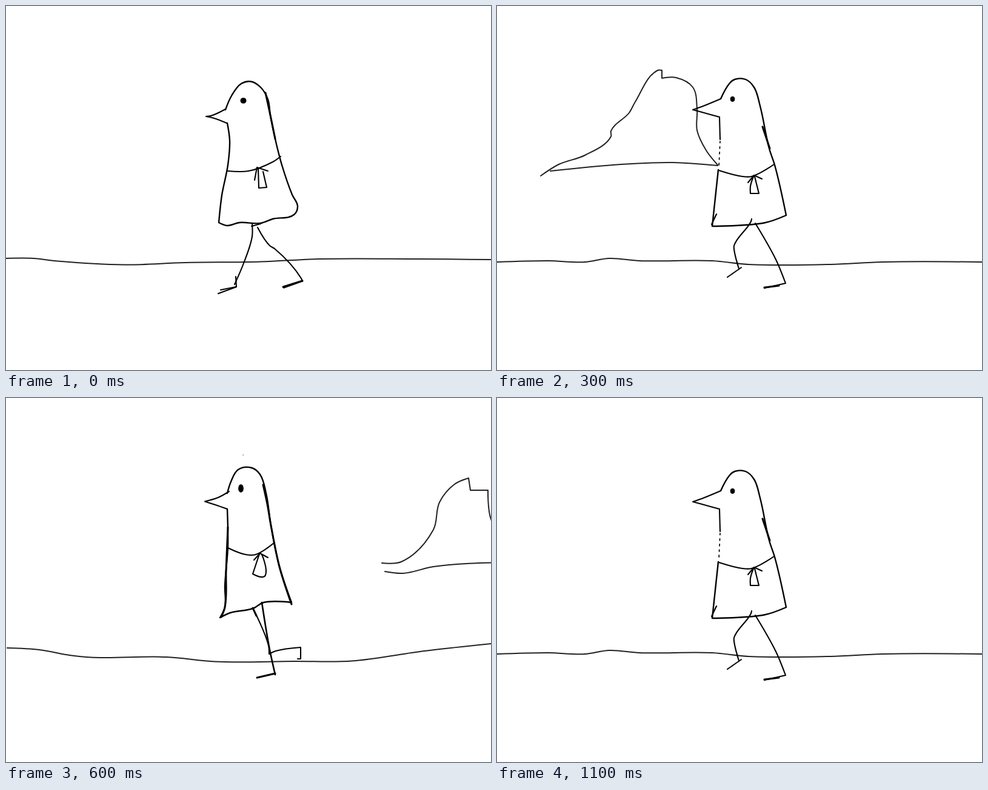
Animation of 800 by 600 pixels, one loop 1200 ms. Source, as an HTML page:

```html
<!DOCTYPE html>
<html lang="en">
<head>
<meta charset="utf-8">
<title>Walking bird</title>
<style>
  html, body { margin: 0; width: 100%; height: 100%; overflow: hidden; background: #fff; }
  svg { display: block; width: 800px; height: 600px; }
  g[hidden] { display: none; }
  path { fill: none; stroke: #000; stroke-linecap: round; stroke-linejoin: round; }
  .body { fill: #fff; }
  .scene { stroke: #222; }
  .dots { stroke-dasharray: 3 6; }
</style>
</head>
<body>
<svg id="stage" viewBox="0 0 800 600"></svg>
<script>
const STEP = 100, COUNT = 12;
const stage = document.getElementById('stage');
let layer;

function add(parent, tag, attrs) {
  const el = document.createElementNS('http://www.w3.org/2000/svg', tag);
  for (const key in attrs) el.setAttribute(key, attrs[key]);
  return parent.appendChild(el);
}

function unit(a, b) {
  const d = Math.hypot(b[0] - a[0], b[1] - a[1]) || 1;
  return [(b[0] - a[0]) / d, (b[1] - a[1]) / d];
}

// Direction at a point; zero at sharp turns, so corners stay corners.
function tangent(pts, i) {
  if (i === 0 || i === pts.length - 1) return [0, 0];
  const u = unit(pts[i - 1], pts[i]), v = unit(pts[i], pts[i + 1]);
  if (u[0] * v[0] + u[1] * v[1] < 0.4) return [0, 0];
  return unit([0, 0], [u[0] + v[0], u[1] + v[1]]);
}

function curve(text) {
  const pts = text.split(' ').map(p => p.split(',').map(Number));
  let d = 'M' + pts[0];
  for (let i = 1; i < pts.length; i++) {
    const a = pts[i - 1], b = pts[i];
    const reach = Math.hypot(b[0] - a[0], b[1] - a[1]) / 3;
    const s = tangent(pts, i - 1), e = tangent(pts, i);
    d += `C${a[0] + s[0] * reach},${a[1] + s[1] * reach} ` +
         `${b[0] - e[0] * reach},${b[1] - e[1] * reach} ${b}`;
  }
  return d;
}

const pen = (text, width = 2.1, name = '') =>
  add(layer, 'path', { d: curve(text), 'stroke-width': width, class: name });
const bold = text => pen(text, 3);
const scene = text => pen(text, 2, 'scene');
const body = text => pen(text, 2.4, 'body');
const eye = (cx, cy, rx, ry) => add(layer, 'ellipse', { cx, cy, rx, ry });

function stride() {
  body('362,171 372,148 388,128 404,124.5 420,134 432,154 436,180 444,219 455,262 472,311 481,330 475,344 440,351 420,358 385,357 365,362 351,357 356,312 366,262 369,222 365,193');
  scene('0,416 45,416 85,420.5 195,426.5 295,423 420,421.5 515,417 680,417 800,418');
  bold('428,143 436,180 444,219');
  pen('362,170 338,181 330,182 343,185 364,193');
  eye(391.5, 156, 5, 4.8);
  pen('366,272 400,272 440,257 453,248');
  pen('410,287 414,266 432,272');
  pen('416,268 417,300 430,299 424,273');
  pen('406,359 406,380 392,424 377,459');
  pen('379,446 380,463 350,474');
  pen('354,468 379,463');
  pen('405,363 420,359');
  pen('415,365 435,395 443,400 487,449 489,454');
  bold('457,463 489,453 458,464');
}

function kick() {
  body('360,165 380,134 402,122 415,129 429,155 436,195 449,258 462,295 471,343 440,343 418,340 400,347 378,350 362,361 358,330 358,285 362,255 362,187');
  scene('2,414 50,415 100,421 180,429 265,430 405,426 490,434 655,424 780,421 800,417');
  bold('402,122 424,142 436,195');
  bold('362,225 360,275');
  pen('362,164 350,173 328,178 340,183 362,187');
  eye(391, 155.5, 4, 4.8);
  pen('363,259 375,263 425,260 442,246');
  pen('402,276 411,264 423,272');
  pen('409,267 408,298 420,299 425,285 417,267');
  pen('401,347 400,380 397,407');
  bold('399,350 400,358');
  bold('398,407 412,438');
  bold('411,430 415,453');
  bold('382,454 414,451');
  pen('418,339 445,367 475,392 495,402');
  bold('477,426 494,412');
}

function lift() {
  body('365,157 371,138 383,118 405,115 419,126 429,157 437,210 451,278 471,337 425,337 407,347 370,354 353,362 361,345 361,310 366,245 365,183');
  scene('2,412 55,415 105,424 140,427.5 265,427 345,434.5 475,434 570,433.5 690,417 800,405');
  bold('424,143 431,175 437,210 451,278 471,340');
  bold('366,213 363,285 361,345 355,361');
  pen('368,154 350,164 328,170.5 345,176 365,183');
  eye(387.5, 149, 4.4, 6.8);
  pen('366,247 395,258 412,258 443,238');
  pen('409,267 419,256 432,263');
  pen('418,257 407,290 424,295 428,292 422,258');
  pen('408,348 433,408 434,422 445,417 486,411 486,430 481,430');
  bold('407,346 413,359');
  pen('422,337 434,410 444,456', 2.6);
  bold('414,461 444,454');
  pen('391,94 391.5,94', 1);
}

function reach() {
  body('369,153 384,127 392,121 410,121 424,134 434,165 449,235 458,262 477,345 443,357 355,363 365,270');
  scene('0,422 85,420 145,422 185,416 235,420 355,420 415,426 550,426 635,422 800,422');
  bold('438,199 450,235');
  pen('367,183 368,220');
  pen('368,223 366,265', 1.7, 'dots');
  pen('354,360 362,343');
  pen('369,153 340,165 323,171 345,177 367,183');
  eye(388.5, 153.5, 3.8, 4.4);
  pen('366,271 405,281 420,281 457,261');
  pen('414,291 424,279 437,285');
  pen('423,281 418,297 418,309 432,309 425,281');
  pen('420,351 419,355 391,395 391,401 399,433');
  pen('403,431 380,447');
  pen('426,358 460,418 476,457 441,465');
  bold('441,464 465,461');
}

function nearCloud() {
  scene('0,219 40,198 70,169 74,152 88,125 97,122 105,126 116,143 138,158 142,180 156,207 154,240 182,269 182,276 112,266 25,266 0,270');
}

function middleCloud() {
  scene('72,280 102,261 145,246 188,215 188,206 218,176 228,158 265,106 272,106 272,119 295,118 323,134 330,170 330,205 345,238 364,262');
  scene('88,272 205,261 290,258 364,263');
}

function farCloud() {
  scene('455,272 487,270 540,217 550,172 575,142 598,132 601,152 630,152 635,200 652,224 672,236 690,272 615,272 540,278 490,289 460,286');
}

const walk = [stride, kick, lift, reach];
const sky = { 2: nearCloud, 3: middleCloud, 4: middleCloud, 5: farCloud, 6: farCloud };
const shift = { 4: 163, 6: 165 };

function build(i) {
  const step = add(stage, 'g', { hidden: '' });
  if (sky[i]) {
    layer = add(step, 'g', { transform: `translate(${shift[i] || 0} 0)` });
    sky[i]();
  }
  layer = step;
  walk[i % walk.length]();
  return step;
}

const steps = Array.from({ length: COUNT }, (_, i) => build(i));
const start = performance.now();

function tick() {
  const now = Math.floor((performance.now() - start) / STEP) % COUNT;
  steps.forEach((g, i) => g.toggleAttribute('hidden', i !== now));
  requestAnimationFrame(tick);
}
tick();
</script>
</body>
</html>
```
